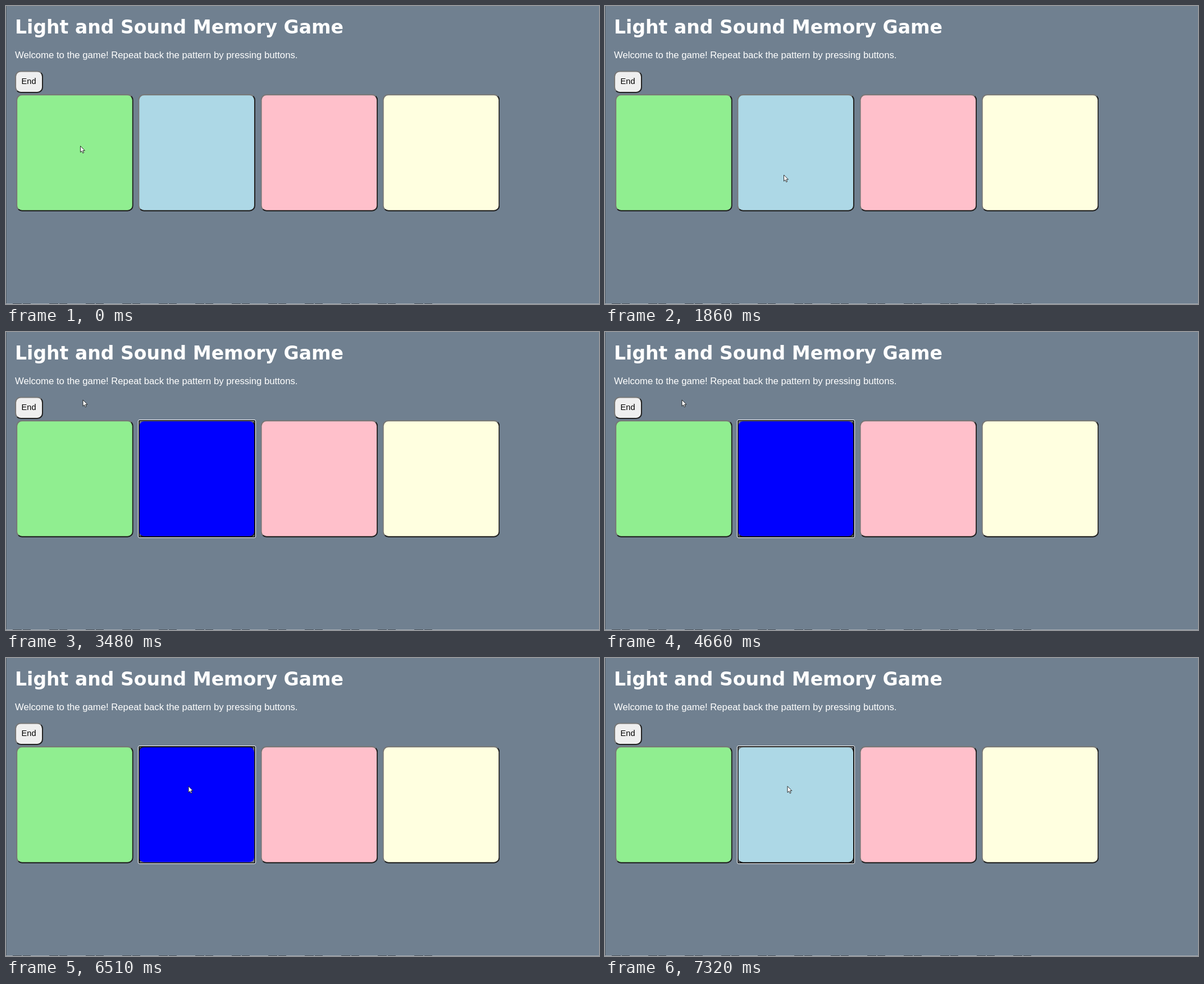
Recreate the animation shown at these times as an HTML page. Size 1056 by 531 pixels, loop 8000 ms.

```html
<!DOCTYPE html>
<html lang="en">
<head>
<meta charset="utf-8">
<title>Light and Sound Memory Game</title>
<style>
  html, body { margin: 0; width: 100%; height: 100%; overflow: hidden; background: slategray; }
  #board { position: absolute; left: 16.4px; top: 0; transform: translateY(.5px) scale(1.044); transform-origin: 0 0; }
  .key {
    position: absolute; top: 150px; width: 200px; height: 200px;
    box-sizing: border-box; border-radius: 10px; border: 2px solid;
    border-color: #767676 #212121 #212121 #767676;
  }
  .key.pressed { border-color: #212121 #767676 #767676 #212121; }
  #end { left: 0; top: 110px; width: 48px; height: 38px; background: #efefef; }
  svg { position: absolute; left: 0; top: 0; }
  text { font-family: "Liberation Sans", Arial, sans-serif; fill: #fff; }
</style>
</head>
<body>
<div id="board"><div class="key" id="end"></div></div>
<svg width="1056" height="531" fill="none">
  <text x="16" y="49" style="font:bold 33.07px 'DejaVu Sans', Verdana, sans-serif">Light and Sound Memory Game</text>
  <text x="16" y="93.3" font-size="16.7">Welcome to the game! Repeat back the pattern by pressing buttons.</text>
  <text x="27.6" y="139.4" font-size="14.6" style="fill:#000">End</text>
  <path d="M.5 0V531" stroke="#535b64"/>
  <path d="M0 530.5H1056" stroke="#a4abb2"/>
  <path d="M12 530.5H788" stroke="#50575f" stroke-dasharray="16 2 14 33"/>
  <g id="ring">
    <rect x="235.5" y="156.5" width="209" height="210" rx="2.5" stroke="#fff"/>
    <rect x="236.8" y="157.8" width="206.4" height="207.4" rx="2" stroke="#101010" stroke-width="1.6"/>
  </g>
  <path id="cursor" d="M.5 .5V11.7L3 9.3L4.8 13.2L6.6 12.4L4.9 8.6H8.4Z" fill="#fff" stroke="#000" stroke-width=".8"/>
</svg>
<script>
const LOOP = 8000, STEP = 120;
const shown = [[420, 1350], [3340, 4280], [4660, 5570]];
const presses = [[2140, 2280], [6510, 6770], [7050, 7320]];
// the pointer glides to each stop in a few visible steps
const stops = [
  { at: 0, steps: 1, x: 132, y: 249 },
  { at: 990, steps: 3, x: 309, y: 281 },
  { at: 1350, steps: 5, x: 318, y: 300.5 },
  { at: 3220, steps: 3, x: 136.5, y: 120.5 },
  { at: 5840, steps: 3, x: 324.5, y: 228 }
];

const find = id => document.getElementById(id);
const ring = find("ring"), cursor = find("cursor");
const keys = ["lightgreen", "lightblue", "pink", "lightyellow"].map((color, i) => {
  const key = document.createElement("div");
  key.className = "key";
  key.style.left = Math.round(2 + 208.45 * i) + "px";
  key.style.background = color;
  return find("board").appendChild(key);
});
const blue = keys[1];

const within = (spans, t) => spans.some(([from, to]) => t >= from && t < to);
const easeOut = p => 1 - (1 - p) ** 3;

function pointer(t) {
  const i = stops.findLastIndex(s => s.at <= t);
  const to = stops[i], from = stops[Math.max(0, i - 1)];
  const step = Math.min(to.steps, Math.floor((t - to.at) / STEP) + 1);
  const p = easeOut(step / to.steps);
  return [from.x + (to.x - from.x) * p, from.y + (to.y - from.y) * p];
}

function draw(now) {
  const t = now % LOOP;
  const pressed = within(presses, t);
  blue.style.background = pressed || within(shown, t) ? "blue" : "lightblue";
  blue.classList.toggle("pressed", pressed);
  ring.style.display = t >= presses[0][0] ? "" : "none";
  cursor.setAttribute("transform", `translate(${pointer(t)})`);
}

const start = performance.now();
function tick() {
  draw(performance.now() - start);
  requestAnimationFrame(tick);
}
tick();
</script>
</body>
</html>
```
